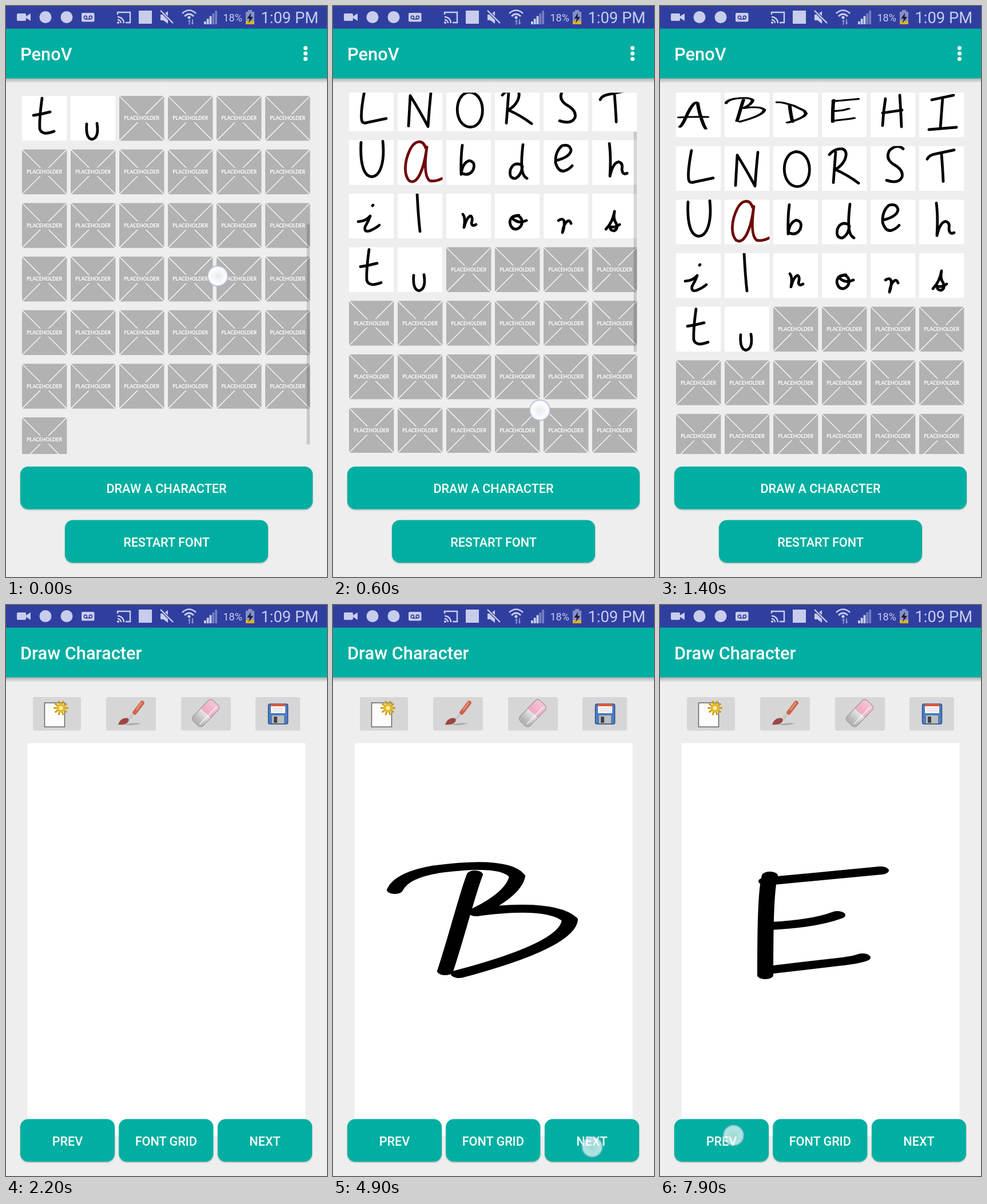
Animation, 561 px wide and 998 px high, one loop 8000 ms. Source, as an HTML page:

```html
<!DOCTYPE html>
<html lang="en">
<head>
<meta charset="utf-8">
<title>Handwriting grid</title>
<style>
html, body { margin: 0; width: 100%; height: 100%; overflow: hidden; background: #eee; }
svg { display: block; width: 100vw; height: 100vh; }
text { font-family: Roboto, sans-serif; fill: #fff; }
.title { font-size: 30.8px; font-weight: 500; }
.label { font-size: 21.6px; font-weight: 500; text-anchor: middle; }
.hold { font: 700 8.7px Lato, sans-serif; text-anchor: middle; }
.ink { fill: none; stroke: #000; stroke-linecap: round; stroke-linejoin: round; }
</style>
</head>
<body>
<svg id="stage" viewBox="0 0 561 998" xmlns="http://www.w3.org/2000/svg"></svg>
<script>
const LOOP = 8000, STEP = 100, TEAL = '#00afa1', ICON = '#c8cdec';
const ROW = 93.65, COL = 85, TOP = 151, CELLS = 61;

// Large letters, drawn with a pen twice as wide as it is high (x is halved).
const pen = {
  A: 'M65 686C78 668 88 605 97 573Q112 515 124 496Q131 487 135 497C139 550 149 620 156 655Q161 685 167 700M60 611Q120 605 175 608',
  B: 'M54 498Q60 472 90 462Q150 446 161 474Q158 505 125 537Q190 520 207 550Q205 595 110 645M124 471C118 500 108 580 98 640',
  D: 'M64 491C85 488 108 505 130 517L163 549Q171 555 174 563L179 581L173 598Q153 625 125 641Q115 649 105 652M114 512C116 550 119 600 126 647',
  E: 'M96 473C92 500 92 590 92 647M93 483L193 464M97 561Q135 557 155 542M95 638L155 624Q170 621 177 616'
};

// Small letters in a 78 px cell, in grid order after A B D E.
const small = [
  'M26 11Q22 35 21 58M51 5Q53 35 54 60M21 36L55 31',
  'M22 13L60 5M41 9L37 62M17 65L65 61',
  'M27 8Q20 45 22 58Q23 66 32 63L65 56',
  'M19 69L22 16Q40 45 53 70Q55 40 58 11',
  'M40 10C12 12 12 70 42 71C72 70 70 8 38 10',
  'M13 15Q22 4 36 5Q46 9 40 24Q34 36 23 41Q44 50 64 65M24 10Q22 38 20 64',
  'M57 5Q46 -5 33 8Q25 22 40 32Q58 42 55 54Q49 67 28 60',
  'M14 23Q17 16 28 14L61 7M39 14Q41 40 42 62',
  'M21 4C19 42 26 64 40 64C54 63 63 40 59 2',
  'M49 14C44 -2 30 0 22 16C12 36 10 60 20 71C34 80 46 52 51 12Q44 62 56 71Q66 73 78 67',
  'M28 9Q25 30 26 60Q28 40 40 36Q52 38 47 52Q40 64 27 58',
  'M49 8Q45 40 48 55Q50 64 56 67M45 43Q32 38 27 52Q24 68 36 67Q46 62 48 46',
  'M21 36Q46 30 48 18Q46 6 32 10Q20 20 21 40Q26 56 36 54Q44 52 50 45',
  'M30 6Q33 30 31 63Q36 40 46 38Q54 40 52 50Q52 62 61 58',
  'M16 49Q30 48 37 39Q34 48 28 58Q26 68 36 65Q46 61 53 55M41 21L42 20',
  'M34 0Q36 40 39 66',
  'M29 36Q34 42 31 59Q36 40 43 39Q47 42 44 52Q45 58 52 54',
  'M42 38Q27 38 26 50Q28 63 38 62Q49 58 47 46Q42 34 29 42Q40 54 55 47',
  'M26 47Q33 42 36 48Q37 58 33 68Q35 52 42 48Q46 46 48 52',
  'M24 62Q36 50 39 31Q36 44 42 52Q46 62 38 65Q30 64 32 58Q40 60 48 54',
  'M35 4Q30 40 31 58Q35 70 56 62M20 34Q34 32 49 28',
  'M28 49Q26 74 37 76Q50 74 46 48'
];
const RED = 9;

const rect = (x, y, w, h, fill, more = '') =>
  `<rect x="${x}" y="${y}" width="${w}" height="${h}" fill="${fill}" ${more}/>`;
const circle = (x, y, r, fill) => `<circle cx="${x}" cy="${y}" r="${r}" fill="${fill}"/>`;
const path = (d, more) => `<path d="${d}" ${more}/>`;
const line = (d, color, w, more = '') => path(d, `fill="none" stroke="${color}" stroke-width="${w}" ${more}`);
const text = (x, y, cls, s) => `<text x="${x}" y="${y}" class="${cls}">${s}</text>`;
const penStroke = d => `<g transform="scale(2 1)">${path(d, 'class="ink" stroke-width="14"')}</g>`;

const button = (x, y, w, s, id = '') =>
  rect(x, y, w, 74.5, TEAL, 'rx="14" filter="url(#lift)"') +
  (id && rect(x, y, w, 74.5, '#fff', `rx="14" id="${id}" opacity="0"`)) +
  text(x + w / 2, y + 46, 'label', s);

function cell(i) {
  const at = `translate(${28 + i % 6 * COL} ${TOP + Math.floor(i / 6) * ROW})`;
  let body;
  if (i < 4) {
    const thumb = penStroke(Object.values(pen)[i]);
    body = `<g transform="scale(.2195) translate(-98 -412)">${thumb}</g>`;
  } else if (i < 26) {
    const red = i - 4 === RED;
    body = path(small[i - 4], `class="ink" stroke-width="4.8" ${red ? 'style="stroke:#6e0808"' : ''}`);
  } else return `<use href="#empty" transform="${at}"/>`;
  return `<g transform="${at}" clip-path="url(#box)">${rect(0, 0, 78.4, 78.4, '#fff')}${body}</g>`;
}

const defs = `<defs>
  <filter id="lift" x="-5%" y="-10%" width="110%" height="130%">
    <feDropShadow dx="0" dy="1.2" stdDeviation="1" flood-opacity=".3"/></filter>
  <linearGradient id="shade" x2="0" y2="1"><stop stop-color="#000" stop-opacity=".27"/>
    <stop offset="1" stop-color="#000" stop-opacity="0"/></linearGradient>
  <linearGradient id="rubber"><stop offset=".1" stop-color="#b5b5b5"/><stop offset=".5" stop-color="#e6e6e6"/>
    <stop offset=".5" stop-color="#f0a9c6"/><stop offset="1" stop-color="#f5c6da"/></linearGradient>
  <radialGradient id="dot"><stop stop-color="#e9ebee"/><stop offset=".7" stop-color="#fff"/>
    <stop offset=".84" stop-color="#f2f4fb"/><stop offset=".9" stop-color="#a9b3da"/>
    <stop offset="1" stop-color="#a9b3da" stop-opacity="0"/></radialGradient>
  <clipPath id="box"><rect width="78.4" height="78.4"/></clipPath>
  <clipPath id="view"><rect y="151.5" width="561" height="631.5"/></clipPath>
  <g id="empty">${rect(0, 0, 78.4, 78.4, '#b2b2b2')}
    ${line('M0 0L78.4 78.4M78.4 0L0 78.4', '#fff', 1.3)}
    ${rect(5, 32, 68, 14.5, '#b2b2b2')}${text(39.2, 42.4, 'hold', 'PLACEHOLDER')}</g>
</defs>`;

const bars = [0, 1, 2, 3, 4].map(i =>
  rect(346 + i * 4.8, 27 - i * 4.7, 3.8, 5 + i * 4.7, ICON, `opacity="${i < 3 ? 1 : .45}"`)).join('');

const status = rect(0, 0, 561, 39.5, '#303f9f') +
  rect(19, 13, 16, 13, ICON, 'rx="2"') + path('M35 18L43 13V26L35 21Z', `fill="${ICON}"`) +
  circle(69, 19.5, 10.5, ICON) + circle(106, 19.5, 10.5, ICON) +
  rect(132, 12, 22.5, 15.5, ICON, 'rx="2"') +
  line('M139 23H148M141.5 20A2.6 2.6 0 1 1 136.3 20A2.6 2.6 0 1 1 141.5 20M150.5 20A2.6 2.6 0 1 1 145.3 20A2.6 2.6 0 1 1 150.5 20', '#303f9f', 1.6) +
  line('M195 15V11H217V29H209M195 19A11 11 0 0 1 206 30M195 24A6 6 0 0 1 201 30', ICON, 2.4) + circle(196, 29, 2, ICON) +
  rect(232, 8, 23, 23, ICON) +
  path('M270 15H275L283 9V31L275 25H270Z', `fill="${ICON}"`) +
  line('M270 8L293 31', '#303f9f', 5) + line('M270 8L292 30', ICON, 2.4) +
  line('M308 13Q320 2 332 13M312 18Q320 10 328 18', ICON, 2.6) + circle(320, 20, 2.6, ICON) +
  `<g id="net">${path('M318 27L320.5 23L323 27H321.5V33H319.5V27ZM323.5 29H325V23H327V29H328.5L326 33Z', `fill="${ICON}"`)}</g>` + bars +
  `<text x="379.5" y="27" font-size="18" style="fill:${ICON}">18%</text>` +
  rect(423, 7, 7, 4, '#8790c6') + rect(419, 10, 15, 22, '#8790c6') + rect(419, 26, 15, 6, '#d8b32a') +
  path('M428 12L421.5 22H426L424 30L432 19H427.5Z', 'fill="#171c3c"') +
  `<text x="445.5" y="30" font-size="27.3" style="fill:${ICON}">1:09 PM</text>`;

const header = rect(0, 126, 561, 9, 'url(#shade)') + rect(0, 39, 561, 87.5, TEAL);

const rays = Array.from({ length: 10 }, (_, i) => {
  const a = i * Math.PI / 5, c = Math.cos(a), s = Math.sin(a);
  return `M${96 + c * 6} ${180 + s * 6}L${96 + c * 13} ${180 + s * 13}`;
}).join('');

const tools = [[47, 84], [175, 87], [306, 87], [436, 78]].map(([x, w]) =>
  rect(x, 161, w, 58.5, '#d6d6d6', 'rx="3"')).join('') +
  rect(67.5, 171, 35, 42, '#fcfcfc', 'stroke="#666" stroke-width="1.5"') +
  line(rays, '#cf9c10', 3) + circle(96, 180, 7.5, '#e3b92c') + circle(96, 180, 3.5, '#fff1a3') +
  path('M206 209Q224 205 236 207Q222 212 206 209Z', 'fill="#aaa"') +
  line('M238 171L225 188', '#d0614a', 7.5, 'stroke-linecap="round"') +
  line('M237 171L228 183', '#ea937a', 2.5, 'stroke-linecap="round"') +
  line('M222 191L215 199', '#c9c9c9', 5) +
  path('M196 209Q199 200 206 198Q214 196 215 201Q212 211 196 209Z', 'fill="#9c4644"') +
  `<g transform="translate(349 189) rotate(-46)">${rect(-25, -12, 50, 24, 'url(#rubber)', 'rx="6" stroke="#999" stroke-width="1.2"')}
    ${line('M-21 6H21', '#fff', 2, 'opacity=".6"')}</g>` +
  rect(458.5, 173, 34, 35, '#4d7cc0', 'rx="3" stroke="#2f4f8c" stroke-width="1.5"') +
  rect(463, 173, 25, 5, '#e2583d') + rect(463, 177, 25, 12, '#f7f7f7') +
  line('M466 181H485M466 185H485', '#ccc', 1) +
  rect(465, 193, 21, 14, '#bdbdbd') + rect(468, 195, 6, 11, '#444');

const grid = rect(0, 0, 561, 998, '#eee') + header + text(25, 95, 'title', 'PenoV') +
  [73.5, 83, 92.5].map(y => circle(523.5, y, 3.6, '#fff')).join('') +
  `<g clip-path="url(#view)"><g id="list">${Array.from({ length: CELLS }, (_, i) => cell(i)).join('')}</g></g>` +
  rect(525.5, 0, 5.5, 385, '#000', 'id="bar"') +
  button(25, 805, 511, 'DRAW A CHARACTER', 'glowDraw') + button(103, 898.5, 355, 'RESTART FONT');

const draw = rect(0, 0, 561, 998, '#eee') + header + text(25, 95, 'title', 'Draw Character') + tools +
  rect(37.5, 241.5, 486, 686.5, '#fff') +
  Object.entries(pen).map(([k, d]) => `<g id="big${k}">${penStroke(d)}</g>`).join('') +
  button(25, 898.5, 165, 'PREV') + button(197.3, 898.5, 165, 'FONT GRID') + button(370, 898.5, 165, 'NEXT', 'glowNext');

const $ = id => document.getElementById(id);
$('stage').innerHTML = defs + `<g>${grid}</g><g id="draw">${draw}</g>${status}
  <circle id="touch" r="19.5" fill="url(#dot)"/>`;

// Tables of [time, value], read linearly or as hard steps.
const scroll = [[0, 368.5], [100, 338], [200, 290], [300, 238], [400, 186.5], [500, 144], [600, 104], [700, 69], [800, 36.5], [900, 12], [1000, 0]];
const dragX = [[0, 370], [400, 363], [800, 360]];
const dragY = [[0, 472], [400, 642], [800, 771], [1000, 805]];
const dragFade = [[0, .95], [900, .95], [1200, 0]];
const barFade = [[0, .16], [1000, .16], [1400, 0]];
const screenFade = [[1900, 0], [2200, 1]];
const letters = [[0, ''], [3500, 'A'], [4900, 'B'], [6000, 'D'], [6900, 'E']];
const taps = [[1700, 300, 846], [3500, 455.5, 948], [4800, 453, 947], [5900, 484, 941], [6800, 470, 940], [7800, 128.5, 927]];
const tapFade = [[0, .72], [100, .68], [200, .4], [300, 0]];
const glow = [[0, 0], [100, .16], [200, .12], [300, 0]];

function mix(table, t) {
  const i = table.findIndex(k => k[0] > t);
  if (i === 0) return table[0][1];
  if (i < 0) return table[table.length - 1][1];
  const [a, u] = table[i - 1], [b, v] = table[i];
  return u + (v - u) * (t - a) / (b - a);
}
const last = (table, t) => table.filter(k => k[0] <= t).pop();
const set = (id, name, v) => $(id).setAttribute(name, v);

function render(t) {
  const y = mix(scroll, t);
  set('list', 'transform', `translate(0 ${-y})`);
  set('bar', 'y', 156 + y * .612);
  set('bar', 'opacity', mix(barFade, t));
  set('draw', 'opacity', mix(screenFade, t));

  const letter = last(letters, t)[1];
  for (const k in pen) set('big' + k, 'display', k === letter ? 'inline' : 'none');

  const tap = last(taps, t);
  set('touch', 'cx', tap ? tap[1] : mix(dragX, t));
  set('touch', 'cy', tap ? tap[2] : mix(dragY, t));
  set('touch', 'opacity', tap ? mix(tapFade, t - tap[0]) : mix(dragFade, t));
  set('glowDraw', 'opacity', mix(glow, t - 1700));
  set('glowNext', 'opacity', mix(glow, t - 6800));
  set('net', 'opacity', t >= 2500 && t < 4500 || t >= 6600 && t < 7600 ? 1 : .6);
}

const start = performance.now();
function tick() {
  const t = (performance.now() - start) % LOOP;
  render(Math.floor(t / STEP) * STEP);
  requestAnimationFrame(tick);
}
tick();
</script>
</body>
</html>
```
